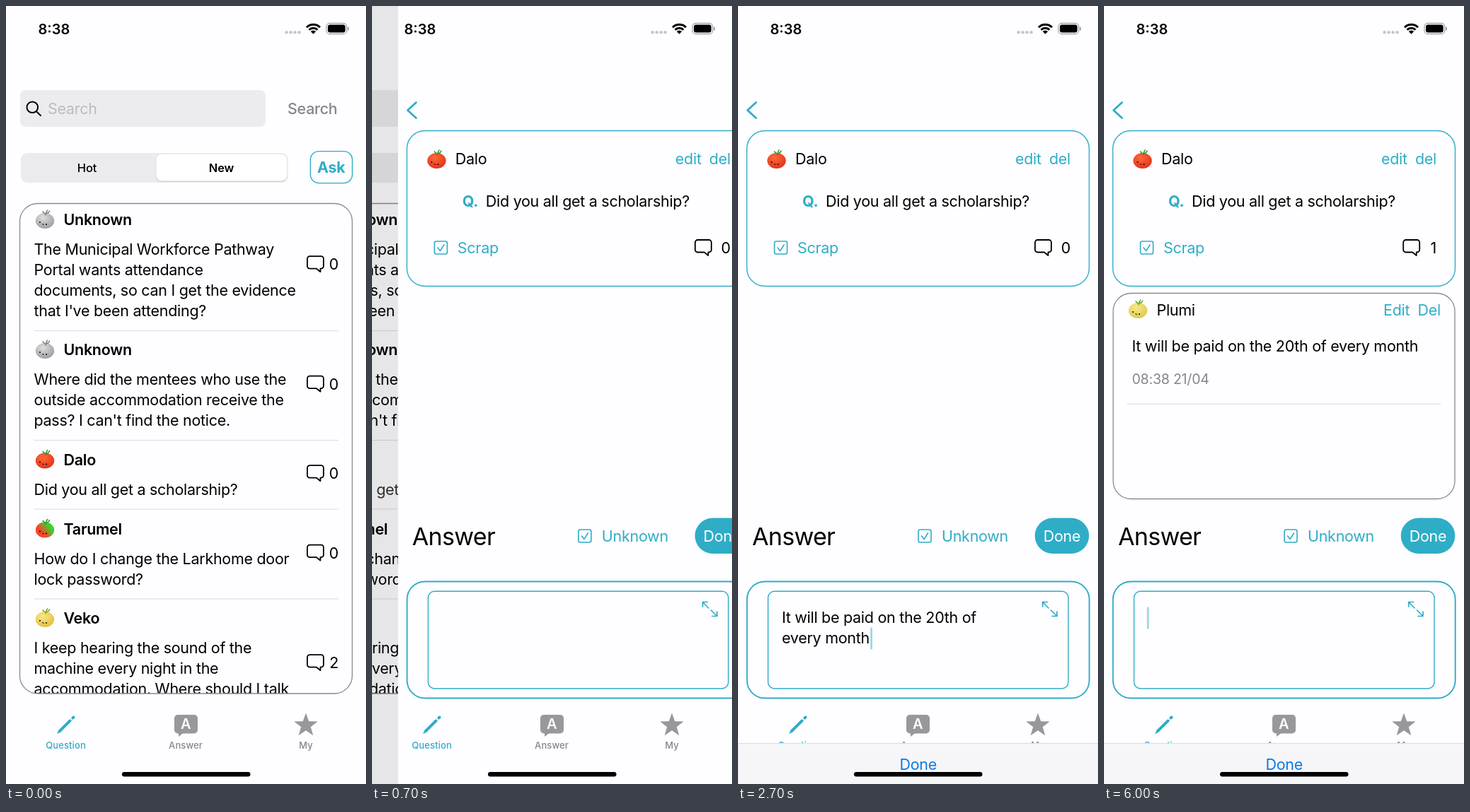
An HTML page that plays this animation: 509x1101 px, repeating every 6100 ms.

```html
<!DOCTYPE html>
<html lang="en">
<head>
<meta charset="utf-8">
<title>Question board</title>
<style>
  html, body { margin: 0; width: 100%; height: 100%; overflow: hidden; background: #fefdff; }
  svg { display: block; width: 100vw; height: 100vh; }
  text {
    font: 400 21.5px Inter, "Noto Sans", sans-serif;
    font-optical-sizing: none; letter-spacing: -.29px; fill: #000; white-space: pre;
  }
  .medium { font-weight: 500; }
  .semi { font-weight: 600; }
  .bold { font-weight: 700; }
  .teal { fill: #2fadc7; }
  .grey { fill: #868588; }
  .hint { fill: #bdbbbf; }
  .white { fill: #fff; }
  .blue { fill: #0a7ae8; }
  .clock { font-size: 20px; letter-spacing: 0; }
  .segment { font-size: 16.5px; letter-spacing: -.1px; }
  .tab { font-size: 13px; letter-spacing: .1px; }
  .title { font-size: 34px; letter-spacing: -.7px; }
  .date { font-size: 19.5px; letter-spacing: -.2px; }
  .line { fill: none; stroke: #2fadc7; stroke-linecap: round; stroke-linejoin: round; }
  .ink { stroke: #000; }
  .edge { stroke: #8a898c; }
  .rule { stroke: #dcdbde; }
</style>
</head>
<body>
<svg id="stage" viewBox="0 0 509 1101" xmlns="http://www.w3.org/2000/svg"></svg>
<script>
const LOOP = 6100, STEP = 100;
const WIDTH = 509, HEIGHT = 1101, TOOLBAR_TOP = 1043.5, CORNER = 25.3;
const PAPER = '#fefdff', TEAL = '#2fadc7';
const PUSH = 465.5, FOCUS = 1400, PASTE = 2000, SEND = 4300, POSTED = 4600;

// --- drawing helpers ---
const text = (x, y, str, style = '', anchor = 'start') =>
  `<text x="${x}" y="${y}" class="${style}" text-anchor="${anchor}">${str}</text>`;
const lines = (x, y, list) => list.map((s, i) => text(x, y + 29 * i, s)).join('');
const box = (x, y, w, h, r, attrs) =>
  `<rect x="${x}" y="${y}" width="${w}" height="${h}" rx="${r}" ${attrs}/>`;
const path = (d, width, style = '') =>
  `<path class="line ${style}" stroke-width="${width}" d="${d}"/>`;
const outline = (width, style = '') => `class="line ${style}" stroke-width="${width}"`;
const group = (id, content, attrs = '') => `<g id="${id}" ${attrs}>${content}</g>`;

const bubble = (x, y) => `<g transform="translate(${x} ${y})">` +
  path('M-8-10H8a3.5 3.5 0 0 1 3.5 3.5V4A3.5 3.5 0 0 1 8 7.5H7V12L1.5 7.5H-8A3.5 3.5 0 0 1-11.5 4V-6.5A3.5 3.5 0 0 1-8-10Z', 1.8, 'ink') + '</g>';
const comments = (x, y, count) => bubble(x, y) + text(470, y + 8.8, count, '', 'end');
const checkbox = (x, y) => box(x - 9, y - 9, 18, 18, 2.5, outline(1.6)) +
  path(`M${x - 4.5} ${y}l3.5 4.5 5.5-8.5`, 1.6);

const skins = {
  grey: ['#dededf', '#9b9b9d', '#858587'],
  red: ['#ff6a38', '#e2301a', '#2f9e2f'],
  mixed: ['#f8452a', '#3fd02c', '#2f9e2f'],
  gold: ['#f9e885', '#e2bd43', '#7fa82e'],
  lemon: ['#f5ea88', '#dcc850', '#6fa82e']
};
const gradients = Object.entries(skins).map(([name, [light, dark]]) => {
  const tag = name === 'mixed' ? 'linearGradient' : 'radialGradient';
  const shape = name === 'mixed' ? 'x1=".3" y1=".6" x2=".75" y2=".3"' : 'cx=".4" cy=".3" r=".75"';
  return `<${tag} id="${name}" ${shape}><stop stop-color="${light}"/><stop offset="1" stop-color="${dark}"/></${tag}>`;
}).join('');

const avatar = (x, y, skin) => `<g transform="translate(${x} ${y})">
  <ellipse cy="2" rx="13.2" ry="11" fill="url(#${skin})"/>
  <path d="M1-6Q1-9 3.5-13M1.5-8Q-1-8-3-11M2-8.5Q5-8 6.5-12" fill="none" stroke="${skins[skin][2]}" stroke-width="1.6" stroke-linecap="round"/>
  <circle cx="-7" cy="4" r="1"/><circle cx="2" cy="7" r="1"/>
  <path d="M-4 6q1 2 3 1" fill="none" stroke="#000" stroke-width=".9"/></g>`;

const questions = [
  { y: 302, icon: 364.2, skin: 'grey', name: 'Unknown', replies: 0, body: [
    'The Municipal Workforce Pathway', 'Portal wants attendance',
    'documents, so can I get the evidence', "that I've been attending?"] },
  { y: 486, icon: 533.7, skin: 'grey', name: 'Unknown', replies: 0, body: [
    'Where did the mentees who use the', 'outside accommodation receive the',
    "pass? I can't find the notice."] },
  { y: 641.5, icon: 660.2, skin: 'red', name: 'Dalo', replies: 0, id: 'tapped',
    body: ['Did you all get a scholarship?'] },
  { y: 739.5, icon: 772.7, skin: 'mixed', name: 'Tarumel', replies: 0,
    body: ['How do I change the Larkhome door', 'lock password?'] },
  { y: 866, icon: 928.2, skin: 'gold', name: 'Veko', replies: 2, body: [
    'I keep hearing the sound of the', 'machine every night in the',
    'accommodation. Where should I talk'] }
];
const row = (q, i) =>
  group(q.id || 'row' + i, avatar(55, q.y, q.skin) + text(81.5, q.y + 8, q.name, 'semi') +
    lines(39.5, q.y + 50, q.body) + comments(437.5, q.icon, q.replies)) +
  path(`M40 ${q.y + 41.5 + 29 * q.body.length}H470`, 1, 'rule');

// --- screens ---
const listPage = box(0, 0, WIDTH, HEIGHT, 0, `fill="${PAPER}"`) +
  box(20, 119, 347, 52, 8, 'fill="#ecebed"') +
  '<circle cx="37.3" cy="143.3" r="7.8" class="line ink" stroke-width="2"/>' +
  path('M43 149.3L49 155', 2.1, 'ink') +
  text(59, 153, 'Search', 'hint') + text(398, 153, 'Search', 'medium grey') +
  box(21, 208, 378, 42, 9, 'fill="#ebeaec"') +
  box(212, 211, 185, 38, 8, 'fill="#000" opacity=".1"') +
  box(212.5, 210, 184.5, 37.5, 8, 'fill="#fff"') +
  text(114.5, 234.7, 'Hot', 'segment medium', 'middle') +
  text(304.5, 234.7, 'New', 'segment semi', 'middle') +
  box(430.4, 205.6, 59.2, 45, 12, outline(1.4)) + text(440, 236, 'Ask', 'bold teal') +
  group('rows', questions.map(row).join(''), 'clip-path="url(#listClip)"') +
  box(19.5, 279.5, 470, 693.5, CORNER, outline(1.3, 'edge'));

const answerCard = box(13, 406.5, 483, 291, CORNER, outline(1.3, 'edge')) +
  avatar(48, 429, 'lemon') + text(74.5, 437.5, 'Plumi') +
  text(395, 437.5, 'Edit', 'teal') + text(476, 437.5, 'Del', 'teal', 'end') +
  text(39.5, 488.5, 'It will be paid on the 20th of every month') +
  text(39.5, 535, '08:38 21/04', 'date grey') + path('M33 563.3H476', 1, 'rule');

const detailPage = box(0, 0, WIDTH, HEIGHT, 0, `fill="${PAPER}"`) +
  path('M25.5 136.5L13.5 147.5L25.5 158.5', 2.8) +
  box(12.5, 176.5, 484, 220, CORNER, outline(1.4)) +
  avatar(54.5, 217, 'red') + text(81, 224, 'Dalo') +
  text(392, 224, 'edit', 'teal') + text(470, 224, 'del', 'teal', 'end') +
  text(91, 284, 'Q.', 'bold teal') + text(124, 284, 'Did you all get a scholarship?') +
  checkbox(60.5, 342) + text(84, 350, 'Scrap', 'teal') +
  group('unanswered', comments(431.5, 341, 0)) + group('answered', comments(434.7, 341, 1)) +
  group('answer', answerCard) +
  text(20, 762.5, 'Answer', 'title') +
  checkbox(264, 750) + text(288, 758, 'Unknown', 'teal') +
  box(419.7, 724.5, 76.6, 50.4, 25.2, `fill="${TEAL}"`) +
  group('send', text(458, 757.5, 'Done', 'white', 'middle')) +
  box(12.7, 814.5, 484, 165, CORNER, outline(1.9)) +
  box(42.5, 828.3, 424.5, 137.7, 9, outline(1.4)) +
  path('M430.7 850V843.5H437.5M430.7 843.5L439 852M451 857V863.5H444M451 863.5L442.5 855', 1.7) +
  group('draft', lines(62, 873, ['It will be paid on the 20th of', 'every month'])) +
  box(60.8, 850.5, 2.6, 31, 1.3, `id="caret" fill="${TEAL}"`);

const star = Array.from({ length: 10 }, (_, i) => {
  const r = i % 2 ? 7.2 : 17.6, a = Math.PI * (i / 5 - .5);
  return (424 + r * Math.cos(a)).toFixed(1) + ',' + (1018 + r * Math.sin(a)).toFixed(1);
}).join(' ');
const tabBar = path('M77 1025L90.5 1011.5', 4) + path('M94.3 1007.7L95.5 1006.5', 4) +
  `<path d="M75 1023.5L72 1030.3L78.5 1027Z" fill="${TEAL}"/>` +
  text(84.5, 1051, 'Question', 'tab medium teal', 'middle') +
  box(238, 1003, 33, 26.5, 5, 'fill="#98979a"') +
  '<path d="M244 1028V1034L252 1028Z" fill="#98979a"/>' +
  text(254.3, 1022.5, 'A', 'clock semi white', 'middle') +
  text(254, 1051, 'Answer', 'tab medium grey', 'middle') +
  `<polygon points="${star}" fill="#98979a"/>` +
  text(424, 1051, 'My', 'tab medium grey', 'middle');

const arc = (r, width) => {
  const d = r * Math.SQRT1_2;
  return `<path d="M${434.5 - d} ${39.7 - d}A${r} ${r} 0 0 1 ${434.5 + d} ${39.7 - d}" fill="none" stroke="#000" stroke-width="${width}"/>`;
};
const statusBar = text(45.5, 39.7, '8:38', 'clock semi') +
  [396.6, 402.6, 408.6, 414.6].map(x => `<circle cx="${x}" cy="37.3" r="2.2" fill="#c6c5c8"/>`).join('') +
  arc(13.4, 3.1) + arc(8.4, 3) + arc(2.6, 5.2) +
  box(453, 24.5, 28.7, 15, 4.6, 'fill="none" stroke="#a5a4a7" stroke-width="1.3"') +
  box(455, 26.5, 24.7, 11, 2.9, '') + box(483, 29.5, 2, 5.2, 1, 'fill="#a5a4a7"');

const toolbar = box(0, 0, WIDTH, 60, 0, 'fill="#f6f5f8"') +
  path(`M0 0H${WIDTH}`, 1, 'rule') + text(254.7, 37, 'Done', 'blue', 'middle');

document.getElementById('stage').innerHTML =
  `<defs>${gradients}<clipPath id="listClip">${box(19.5, 279.5, 470, 693.5, CORNER, '')}</clipPath></defs>` +
  group('list', listPage) + box(0, 0, WIDTH, HEIGHT, 0, 'id="dim"') + group('detail', detailPage) +
  tabBar + group('toolbar', toolbar) + statusBar + box(164, 1084, 181.5, 6.5, 3.2, '');

// --- motion ---
const el = id => document.getElementById(id);
const move = (id, x, y) => el(id).setAttribute('transform', `translate(${x} ${y})`);
const fade = (id, opacity) => el(id).setAttribute('opacity', opacity);
const clamp = v => Math.max(0, Math.min(1, v));

// Remaining distance of a critically damped spring, from 1 down to 0.
const spring = ms => {
  const k = Math.max(0, ms) * .0183;
  return k > 9 ? 0 : (1 + k) * Math.exp(-k);
};

function caretOpacity(sinceReset) {
  if (sinceReset < 600) return 1;
  const phase = sinceReset % 1000;
  if (phase < 100) return .5;
  return phase < 600 ? 1 : phase < 700 ? .8 : phase < 800 ? .5 : 0;
}

function render(t) {
  const rest = spring(t - PUSH);
  move('list', -.3 * WIDTH * (1 - rest), 0);
  fade('dim', .1 * (1 - rest));
  move('detail', WIDTH * rest, 0);
  fade('tapped', t < 500 ? 1 : clamp(.28 + (t - 500) / 380));

  move('toolbar', 0, TOOLBAR_TOP + (HEIGHT + 1 - TOOLBAR_TOP) * spring(t - 1340));

  const drafting = t >= PASTE && t < SEND;
  fade('draft', +drafting);
  move('caret', drafting ? 126.5 : 0, drafting ? 29 : 0);
  const reset = t >= SEND ? SEND : t >= PASTE ? PASTE : FOCUS;
  fade('caret', t < FOCUS ? 0 : caretOpacity(t - reset));

  fade('send', t < SEND ? 1 : clamp(.3 + (t - SEND) / 500));
  const posted = t >= POSTED;
  fade('answer', +posted);
  fade('answered', +posted);
  fade('unanswered', +!posted);
}

const start = performance.now();
function tick() {
  const t = (performance.now() - start) % LOOP;
  render(Math.floor(t / STEP) * STEP);
  requestAnimationFrame(tick);
}
tick();
</script>
</body>
</html>
```
